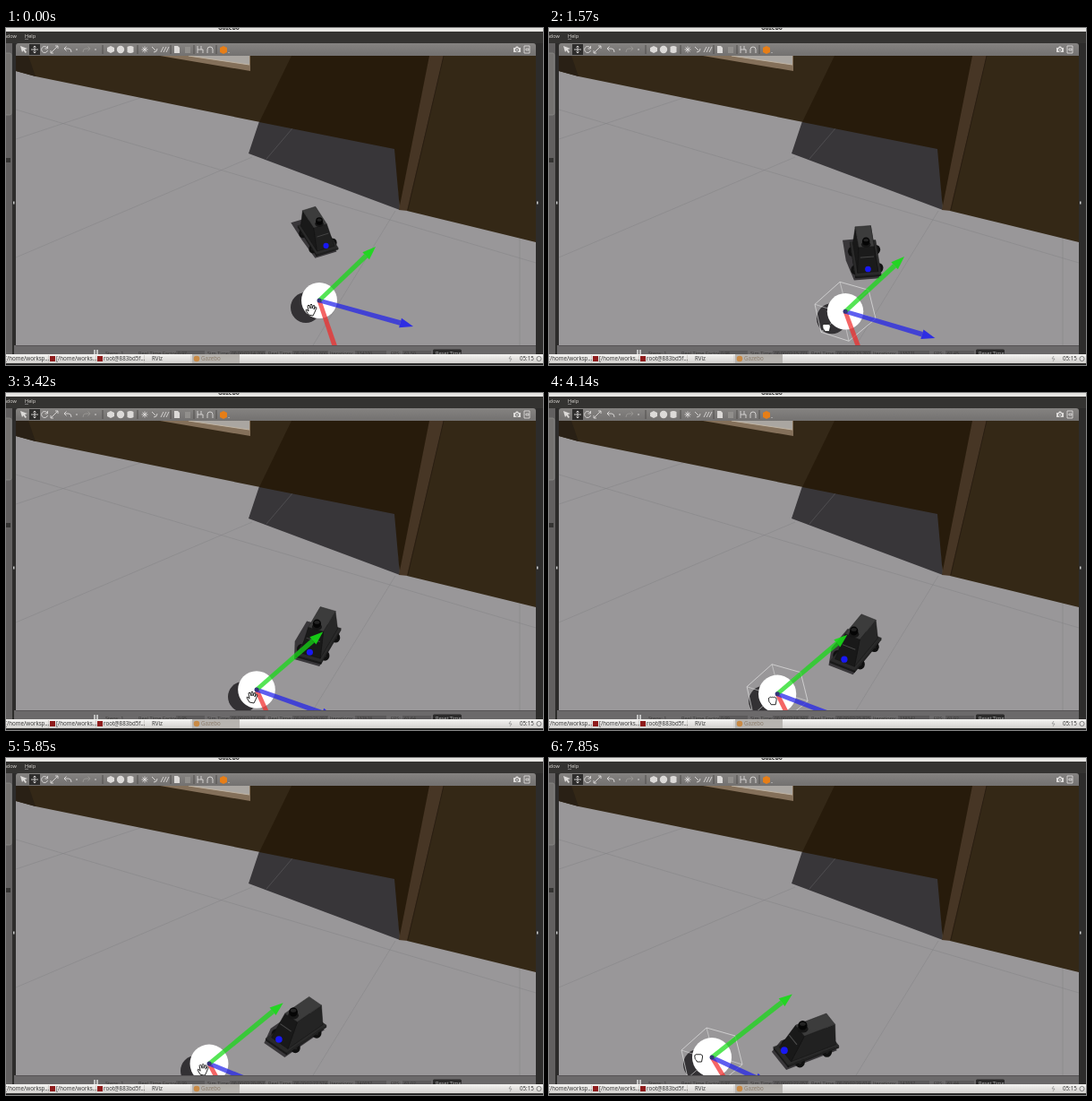
An HTML page that plays this animation: 600x376 px, repeating every 8000 ms.

```html
<!DOCTYPE html>
<html lang="en">
<head>
<meta charset="utf-8">
<title>Robot follows a ball</title>
<style>
html, body { margin: 0; width: 100%; height: 100%; overflow: hidden; background: #2b2a29; }
svg { display: block; width: 100vw; height: 100vh; }
text { font-family: "Open Sans", "Noto Sans", sans-serif; }
.menu text { font-size: 5.6px; fill: #dedbd7; }
.status text { font-size: 5.6px; fill: #393837; }
.tasks text { font-size: 6.2px; fill: #333; }
</style>
</head>
<body>
<svg viewBox="0 0 600 376" xmlns="http://www.w3.org/2000/svg">
  <defs>
    <clipPath id="view"><rect x="11" y="31" width="581" height="323"/></clipPath>
    <clipPath id="bar"><rect x="0" y="354" width="600" height="10"/></clipPath>
    <linearGradient id="task" x1="0" y1="0" x2="0" y2="1">
      <stop offset="0" stop-color="#f4f3f1"/><stop offset="1" stop-color="#d2d0cd"/>
    </linearGradient>
    <linearGradient id="tool" x1="0" y1="0" x2="0" y2="1">
      <stop offset="0" stop-color="#858381"/><stop offset="1" stop-color="#737170"/>
    </linearGradient>
  </defs>

  <rect width="600" height="376" fill="#2d2c2b"/>
  <rect width="600" height="4" fill="#e6e5e2"/>
  <text x="237" y="1.6" font-size="6.5" font-weight="700" fill="#333">Gazebo</text>
  <rect y="4" width="600" height="13" fill="#343331"/>
  <g class="menu">
    <text x="-4" y="11.3">indow</text><text x="21" y="11.3">Help</text>
    <path d="M21 12.4h4" stroke="#ccc" stroke-width=".5"/>
  </g>
  <path d="M11 31V20q0-3 3-3H589q3 0 3 3V31Z" fill="url(#tool)"/>
  <rect y="17" width="7" height="347" fill="#626060"/>
  <path d="M0 28h4q2 0 2 2v65q0 2-2 2h-4" fill="#747270" stroke="#8a8886" stroke-width=".8"/>
  <rect x="0" y="145" width="5" height="5" fill="#353433"/>
  <g id="panel" fill="#4a4846" stroke="#9a9896" stroke-width=".7">
    <rect x="-2" y="157" width="7" height="8"/><rect x="-2" y="172" width="7" height="8"/>
    <path d="M0 187h5"/>
  </g>
  <g fill="#ccc"><rect x="8" y="193.5" width="1.5" height="3"/><rect x="593" y="193.5" width="1.5" height="3"/></g>
  <g id="tools" fill="none" stroke="#dcdad8" stroke-width=".9"></g>

  <g clip-path="url(#view)">
    <rect x="11" y="31" width="581" height="323" fill="#999799"/>
    <g stroke="#7d7b7e" stroke-width=".6" fill="none">
      <path d="M11 124L153 77M11 256L275 144M11 91L592 262M435 204L343 354M574 234V354" opacity=".65"/>
    </g>
    <path d="M283 104L436 134L440 203L271 140Z" fill="#383639"/>
    <path d="M320 112L291 146" stroke="#5a585b" stroke-width=".7"/>
    <path d="M11 31H330L284 105L33 54L11 48Z" fill="#342817"/>
    <path d="M11 31H25L33 54L11 48Z" fill="#292015"/>
    <path d="M172 31H273V48Z" fill="#84705a"/>
    <path d="M203 31H272V41Z" fill="#aaa6a1"/>
    <path d="M204 31L272 41" stroke="#c0b4a3" stroke-width="1"/>
    <path d="M319 31H475L440 203L434 135L283 105Z" fill="#271b0b"/>
    <path d="M473 31H490L449 204L439 203Z" fill="#473625"/>
    <path d="M489 31H592V239L448 204Z" fill="#342816"/>
    <path d="M489 31L449 203" stroke="#2a1e12" stroke-width="1"/>
    <g id="scene"></g>
  </g>

  <g class="status" clip-path="url(#bar)">
    <rect x="9" y="354" width="583" height="10" fill="#6b696a"/>
    <path d="M11 354.4H592" stroke="#4d4b4c" stroke-width=".8"/>
    <path d="M99 359v6M102 359v6" stroke="#ddd" stroke-width="1.5"/>
    <g id="status"></g>
  </g>
  <g class="tasks">
    <rect y="364" width="600" height="10.3" fill="url(#task)"/>
    <path d="M47.5 365v9M100.5 365v9M154.5 365v9M207 365v9" stroke="#c4c1bd" stroke-width=".7"/>
    <rect x="208" y="364" width="53" height="10" fill="#b7b4b0"/>
    <text x="-1" y="371">[/home/worksp...</text>
    <rect x="49" y="366" width="6" height="6" fill="#8f1c1c"/><text x="56" y="371">[/home/works...</text>
    <rect x="102" y="366" width="6" height="6" fill="#8f1c1c"/><text x="109" y="371">root@883bd5f...</text>
    <text x="163" y="371">RViz</text>
    <circle cx="213" cy="369" r="3.3" fill="#c98a45"/><text x="218" y="371" style="fill:#8a7a69">Gazebo</text>
    <path d="M564 366l-2 3h3l-2 3" fill="none" stroke="#888" stroke-width=".7"/>
    <text x="574" y="371">05:15</text>
    <circle cx="595.5" cy="369" r="2.6" fill="none" stroke="#666" stroke-width=".8"/>
    <rect y="374.3" width="600" height="2" fill="#222"/>
  </g>
</svg>
<script>
const LOOP = 8000, STEPS = 56;
const $ = id => document.getElementById(id);

// rows: time, then values
const ROBOT = [ // front x, front y, heading
  [0, 359, 254, 66], [1000, 360, 271, 76], [2280, 353, 294, 93], [3420, 338, 302, 112],
  [4850, 318, 318, 127], [5850, 302, 327, 135], [7850, 259, 339, 151]];
const BALL = [
  [0, 350, 304], [800, 350, 304], [1000, 348, 310], [2280, 310, 324], [3250, 280, 331],
  [3650, 280, 331], [4700, 227, 341], [6000, 227, 341], [7100, 182, 334]];
const HAND = [
  [0, 341, 314], [700, 338, 316], [1000, 321, 332], [2280, 296, 338], [3250, 275, 339],
  [3650, 275, 339], [4700, 221, 349], [6000, 220, 347], [7100, 167, 335]];
const DRAG = [[700, 3250], [3600, 5200], [5950, 8000]];

function at(keys, t) {
  const i = keys.findIndex(k => k[0] > t);
  if (i < 0) return keys[keys.length - 1].slice(1);
  const a = keys[i - 1], b = keys[i], f = (t - a[0]) / (b[0] - a[0]);
  return a.slice(1).map((v, j) => v + (b[j + 1] - v) * f);
}

const pts = list => list.map(p => p.map(n => n.toFixed(1)).join()).join(' ');
const poly = (list, fill, more = '') => `<polygon points="${pts(list)}" fill="${fill}" ${more}/>`;
const oval = (x, y, rx, ry, fill, more = '') =>
  `<ellipse cx="${x}" cy="${y}" rx="${rx}" ry="${ry}" fill="${fill}" ${more}/>`;
const cross = (a, b, c) => (b[0] - a[0]) * (c[1] - a[1]) - (b[1] - a[1]) * (c[0] - a[0]);
const gray = g => `rgb(${g},${g},${g})`;

function hull(list) {
  const half = src => {
    const out = [];
    for (const p of src) {
      while (out.length > 1 && cross(out[out.length - 2], out[out.length - 1], p) <= 0) out.pop();
      out.push(p);
    }
    return out.slice(0, -1);
  };
  const s = [...list].sort((a, b) => a[0] - b[0] || a[1] - b[1]);
  return [...half(s), ...half(s.reverse())];
}

function robot([x, y, deg]) {
  const s = .88 + (y - 254) * .0028, rad = deg * Math.PI / 180, c = Math.cos(rad), n = Math.sin(rad);
  // u runs forward from the front edge, v across, z up
  const P = (u, v, z) => [x + s * (u * c - v * n), y + s * (.69 * (u * n + v * c) - .72 * z)];
  const shade = (u, v, z) => { const p = P(u, v, 0); return [p[0] - .45 * s * z, p[1] - .25 * s * z]; };
  const ring = (front, back, w, z, f = P) => [f(front, w, z), f(back, w, z), f(back, -w, z), f(front, -w, z)];
  const light = [-n, -c, n, c]; // left, back, right, front

  function solid(low, high, top) {
    const sides = light.map((l, i) => {
      const j = (i + 1) % 4, face = [low[i], low[j], high[j], high[i]];
      if (cross(...face) <= 0) return '';
      return poly(face, gray(Math.round(25 + 16 * Math.max(0, l))), 'stroke="#0e0e0e" stroke-width=".4"');
    });
    return sides.join('') + poly(high, gray(top), 'stroke="#252525" stroke-width=".5"');
  }
  const blob = (u, v, z, rx, ry, fill) => oval(...P(u, v, z), rx * s, ry * s, fill);

  let out = poly(hull([...ring(0, -58, 15, 4, shade), ...ring(-22, -57, 9, 33, shade)]), '#39373a');
  for (const u of [-14, -45]) for (const v of [-14, 14])
    out += blob(u, v, 5, 5, 5.6, '#101010') + blob(u, v, 5, 1.8, 2, '#252525');
  out += solid(ring(0, -58, 15, 5), ring(0, -58, 15, 8), 42);
  out += solid(ring(-5, -56, 12, 8), ring(-22, -57, 9, 33), 60);
  out += `<path d="M${P(-14, 8, 24)}L${P(-14, -8, 24)}" stroke="#494949" stroke-width="${s}"/>`;
  out += blob(-25, 0, 34, 5.5, 3.8, '#161616') + blob(-25, 0, 39, 4.5, 4.8, '#050505') +
    blob(-25, 0, 41, 3, 1.8, '#222');
  return out + blob(-4, 0, 14, 3.5, 3.5, '#1818f4');
}

function arrow(x, y, dx, dy, color, w = 5.6) {
  const len = Math.hypot(dx, dy), deg = Math.atan2(dy, dx) * 180 / Math.PI, neck = len - 15;
  return `<g transform="translate(${x} ${y}) rotate(${deg})" fill="${color}">
    <path d="M0 ${-w / 2 + .4}L${neck} ${-w / 2}V${w / 2}L0 ${w / 2 - .4}Z" opacity=".72"/>
    <path d="M${neck} -5.5L${len} 0L${neck} 5.5Z" opacity=".9"/></g>`;
}

function ball([x, y], drag) {
  const k = 350 - x, r = 20 + k * .012;
  let out = '';
  const box = [[-34, -8], [-6, -33], [26, -24], [34, 8], [4, 33], [-27, 23]].map(p => [x + p[0], y + p[1]]);
  const spokes = (from, mx, my) => [0, 2, 4].map(i => `M${x + mx} ${y + my}L${box[i + from]}`).join('');
  out += oval(x - 15, y + 8, 17, 17, '#333134');
  if (drag) out += poly(box, 'none', 'stroke="#e4e4e4" stroke-width=".7"') +
    `<path d="${spokes(0, -3, 2)}${spokes(1, 2, -2)}" stroke="#dcdcdc" stroke-width=".6"/>`;
  out += oval(x, y, r, r, '#fff');
  const bx = 105 - k * .25, ry = 85;
  return out + arrow(x, y, (.34 + k * .0016) * ry, ry, '#f02a2a') +
    arrow(x, y, bx, bx * (.276 + k * .0011), '#2222ea') +
    arrow(x, y, 63 + k * .16, -60 - k * .063, '#16dc16') +
    oval(x, y, 2.5, 2.5, '#35357a');
}

function hand([x, y], closed) {
  const d = closed
    ? 'M-4 -1q-1-3 1-3q1-1 2 0q1-1 2 0q1-1 2 0q2 0 1.5 3l-1 5h-5l-1-2q-2-1-1.5-3z'
    : 'M-3 6l-3-5q0-2 2 0l1 1l-1-6q1-2 2 0l1 3v-4q1-2 2 0v4l1-3q1-1 2 0l-1 4l1-2q2-1 2 0l-2 5l-2 4z';
  return `<path transform="translate(${x} ${y})" d="${d}" fill="#fff" stroke="#111" stroke-width=".9"/>`;
}

function status(t) {
  const pad = (n, w = 2) => String(Math.floor(n)).padStart(w, '0');
  const clock = ms => `00 00:${pad(ms / 60000)}:${pad(ms / 1000 % 60)}.${pad(ms % 1000, 3)}`;
  const fields = [
    [148, 'Real Time Factor:', 190, 32, (.97 + .02 * Math.sin(t)).toFixed(2)],
    [225, 'Sim Time:', 250, 40, clock(134200 + t)],
    [293, 'Real Time:', 320, 40, clock(141600 + t * 1.02)],
    [362, 'Iterations:', 390, 35, Math.floor(134200 + t)],
    [430, 'FPS:', 443, 32, (61.5 + Math.sin(t * 3)).toFixed(2)]];
  return '<text x="111" y="365">Steps: 1</text>' + fields.map(([x, label, fx, w, v]) =>
    `<text x="${x}" y="365">${label}</text><rect x="${fx}" y="360" width="${w}" height="8" fill="#5b595a"/>
     <text x="${fx + 2}" y="365" style="font-size:5px">${v}</text>`).join('') +
    `<rect x="477" y="358.5" width="32" height="9" rx="1.5" fill="#2c2b2b"/>
     <text x="480" y="365" style="fill:#bbb">Reset Time</text>`;
}

function tools() {
  const put = (x, d, more = '') => `<path transform="translate(${x} 24)" d="${d}" ${more}/>`;
  const solid = 'fill="#dcdad8" stroke="none"';
  return '<rect x="26" y="18" width="12" height="12" fill="#2e2d2c" stroke="none"/>' +
    put(20, 'M-4-4l8 3l-3 1l2 3l-1.5 1l-2-3l-1.5 2z', solid) +
    put(32, 'M-4 0h8M0-4v8M-1.5-2.5L0-4l1.5 1.5M-1.5 2.5L0 4l1.5-1.5') +
    put(43, 'M3-2a3.5 3.5 0 1 0 .5 3M3.5-4v3h-3') +
    put(54, 'M-4 4L4-4M1-4h3v3M-4 1v3h3') +
    put(69, 'M-4-1h5q3 0 3 4M-1.5-3.5L-4-1l2.5 2.5') + put(79, 'M-1 0h2') +
    put(90, 'M4-1h-5q-3 0-3 4M1.5-3.5L4-1l-2.5 2.5', 'stroke="#999794"') + put(100, 'M-1 0h2') +
    [108, 147, 184, 210, 235].map(x => put(x, 'M0-5v10', 'stroke="#4c4a48"')).join('') +
    put(117, 'M-4-2l4-2l4 2v4l-4 2l-4-2z', solid) +
    '<circle cx="128" cy="24" r="4.2" fill="#dcdad8" stroke="none"/>' +
    put(139, 'M-3.5-3q3.5-2 7 0v6q-3.5 2-7 0z', solid) +
    put(155, 'M-3.5 0h7M0-3.5v7M-2.5-2.5l5 5M2.5-2.5l-5 5') +
    put(166, 'M-3-3L1 1M-1 3q4 0 4-4') + put(177, 'M-4 3l3-6M-1 3l3-6M2 3l3-6') +
    put(191, 'M-3-4h4l2 2v6h-6z', solid) + put(203, 'M-3-3h6v7h-6z', 'fill="#918f8c" stroke="none"') +
    put(217, 'M-3-4v8M-3 0h6v4M1-4v4') + put(228, 'M-3 4v-4a3 3 0 0 1 6 0v4') +
    put(243, 'M-4-2l4-2l4 2v5l-4 2l-4-2z', 'fill="#e67e17" stroke="none"') + put(249, 'M0 3v1') +
    put(571, 'M-4-2h2l1-1.5h2l1 1.5h2v5h-8z', solid) + '<circle cx="571" cy="24.5" r="1.5" stroke="#555"/>' +
    put(582, 'M-3-4h6v8h-6zM-1-1h3v2h-3z');
}

function draw(t) {
  const drag = DRAG.some(([a, b]) => t >= a && t < b);
  $('scene').innerHTML = robot(at(ROBOT, t)) + ball(at(BALL, t), drag) + hand(at(HAND, t), drag);
  $('status').innerHTML = status(t);
  $('panel').style.display = t > 4300 && t < 5200 ? '' : 'none';
}

$('tools').innerHTML = tools();
const start = performance.now();
function tick() {
  const t = (performance.now() - start) % LOOP;
  // steps begin on whole hundredths of a second, rounded down
  const step = Math.min(STEPS - 1, Math.floor((t + 9) * STEPS / LOOP));
  draw(step * LOOP / STEPS);
  requestAnimationFrame(tick);
}
tick();
</script>
</body>
</html>
```
